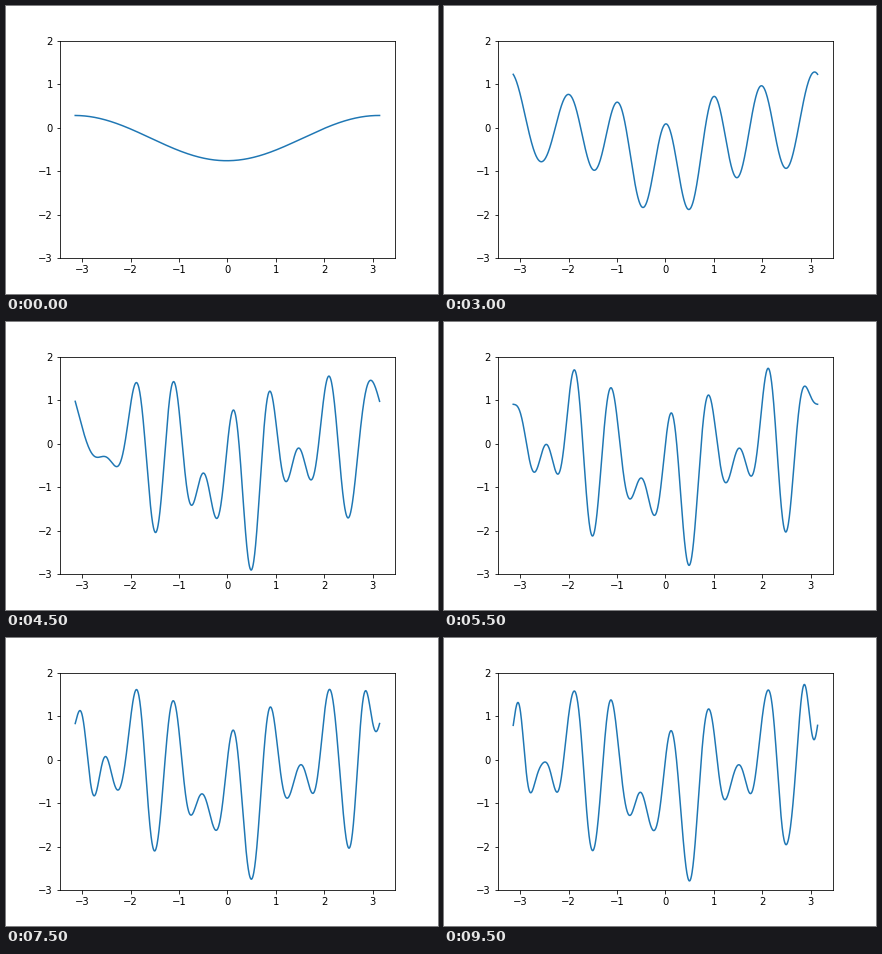
Animation of 432 by 288 pixels, one loop 10 s. Source, as a matplotlib script:

```python
import numpy as np
import matplotlib.pyplot as plt
from matplotlib.animation import FuncAnimation

HARMONICS = 20
INTERVAL = 500  # ms per partial sum


def signal(x):
    return np.cos(2 * np.pi * x) + np.sin(3 * np.pi * x) - np.exp(-x ** 2)


def integrate(y, x):
    return np.sum((y[1:] + y[:-1]) * np.diff(x)) / 2


grid = np.linspace(-np.pi, np.pi, 20001)
values = signal(grid)
mean = integrate(values, grid) / (2 * np.pi)
orders = range(1, HARMONICS + 1)
cos_coef = [integrate(values * np.cos(n * grid), grid) / np.pi for n in orders]
sin_coef = [integrate(values * np.sin(n * grid), grid) / np.pi for n in orders]

x = np.linspace(-np.pi, np.pi, 1000)


def partial_sum(count):
    total = np.full_like(x, mean)
    for n, a, b in zip(range(1, count + 1), cos_coef, sin_coef):
        total += a * np.cos(n * x) + b * np.sin(n * x)
    return total


fig, ax = plt.subplots(figsize=(6, 4), dpi=72)
fig.subplots_adjust(left=0.125, right=0.9, bottom=0.125, top=0.88)
line, = ax.plot(x, partial_sum(1), color="#1f77b4", linewidth=1.5)
ax.set_xlim(-1.1 * np.pi, 1.1 * np.pi)
ax.set_ylim(-3, 2)
ax.set_xticks(range(-3, 4))
ax.set_yticks(range(-3, 3))


def update(frame):
    line.set_ydata(partial_sum(frame + 1))
    return line,


anim = FuncAnimation(fig, update, frames=HARMONICS, interval=INTERVAL,
                     repeat=True, repeat_delay=0)
plt.show()
```
